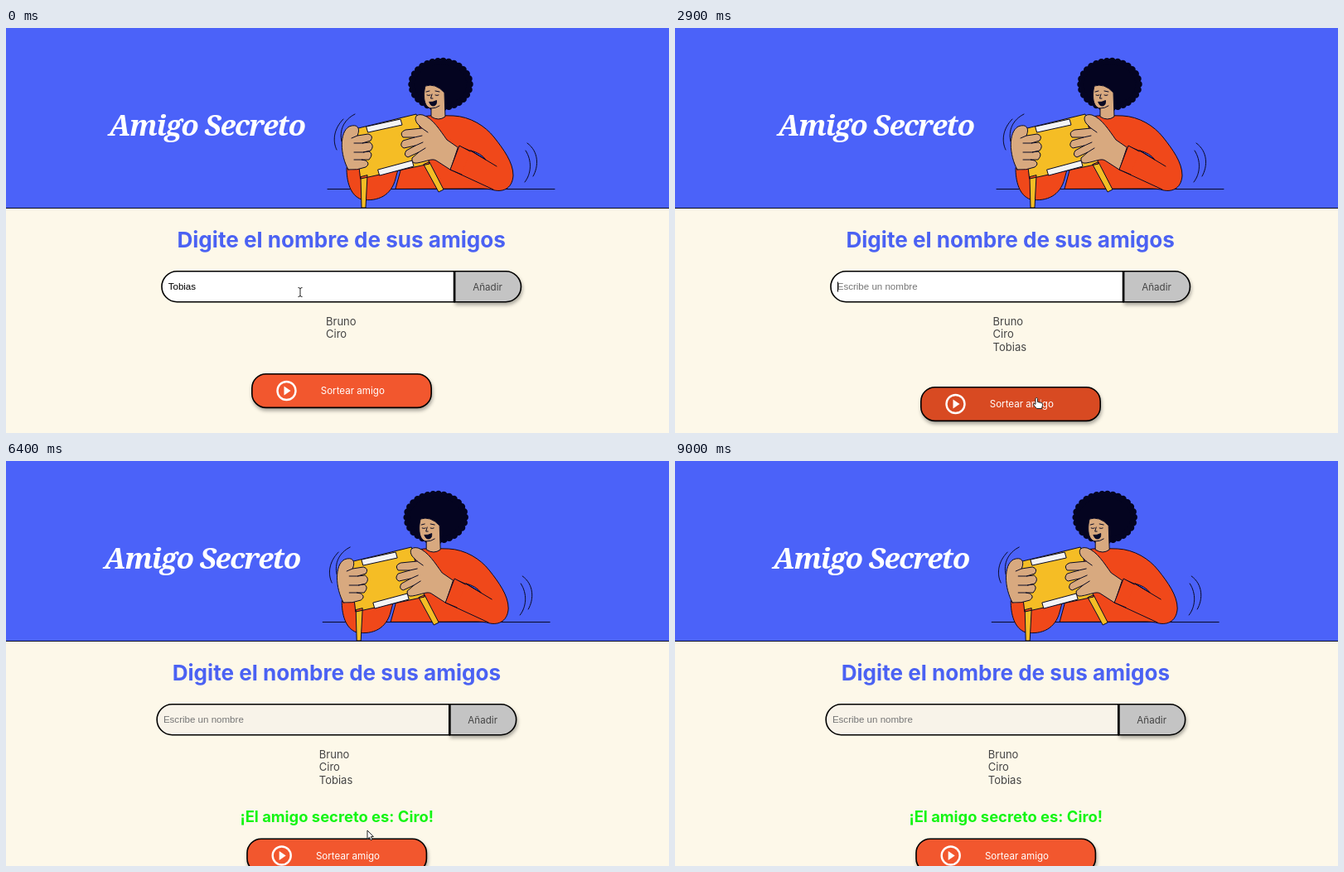
An HTML page that plays this animation: 800x489 px, repeating every 9.1 s.

```html
<!DOCTYPE html>
<html lang="es">
<head>
<meta charset="utf-8">
<title>Amigo Secreto</title>
<style>
  html, body { margin: 0; width: 100%; height: 100%; overflow: hidden; background: #fdf8e9; }
  svg { display: block; }
  text { font-family: Inter, sans-serif; fill: #444; }
  .title { font: italic 700 35px "Noto Serif", serif; letter-spacing: -1.4px; fill: #fff; }
  .heading { font-size: 26.1px; font-weight: 700; fill: #4b62f3; }
  .field { font: 11.55px "Liberation Sans", Arial, sans-serif; }
  .list { font-size: 13px; }
  .result { font-size: 18.4px; font-weight: 700; fill: #14f514; }
  .label { font-size: 11.6px; }
  .mid { text-anchor: middle; }
  .ink { stroke: #090a24; stroke-width: 1; stroke-linejoin: round; stroke-linecap: round; }
  .line { fill: none; }
  .skin { fill: #d8a97f; }
  .cloth { fill: #f0481a; }
  .wood { fill: #f5bd25; }
  .border { stroke: #000; stroke-width: 1.6; }
  .shadow { filter: drop-shadow(1px 3px 2px #0005); }
  .cursor { fill: #fff; stroke: #222; stroke-width: 1; stroke-linejoin: round; }
</style>
</head>
<body>
<svg width="800" height="489" viewBox="0 0 800 489">
  <rect width="800" height="217" fill="#4b62f9"/>
  <path d="M0 217.5H800" stroke="#090c20"/>
  <g id="page">
    <text class="title" x="124" y="130">Amigo Secreto</text>

    <g class="ink">
      <path class="line" d="M388 194.5H662"/>
      <path class="line" d="M407 110C395 122 394 137 399 147M421 104C407 111 402 124 405 137M629 139C643 149 643 167 636 179M627 148C635 160 634 176 626 186"/>
      <path class="cloth" d="M470 194L476 172L492 108Q515 104 540 106C560 107 578 118 589 132C600 146 612 162 612 178C611 195 598 199 586 195Q580 194 575 194Z"/>
      <path class="cloth" d="M411 169C411 185 415 202 429 207C449 210 465 202 470 182L473 171Z"/>
      <path fill="#4b62f9" d="M561 148L579 159Q573 151 561 148Z"/>
      <path class="line" d="M548 143L562 149L592 167M536 171L588 195"/>
    </g>

    <g fill="#040420">
      <ellipse cx="524.5" cy="68" rx="36" ry="29"/>
      <ellipse cx="524.5" cy="68" rx="35" ry="28" fill="none" stroke="#040420" stroke-width="8.5" stroke-linecap="round" stroke-dasharray="0 6.6"/>
    </g>
    <path class="skin ink" d="M506 70Q518 66 529 78L530 107Q522 113 513 107L513 97C504 96 503 81 506 70Z"/>
    <g class="ink line" stroke-width=".8">
      <path d="M513 97Q519 97 523 94M507 77l4-1M518 76l5 1M508 81q2 1 4 0M518 81q2 1 4 0M514 80l-1.5 5h2.5"/>
      <path fill="#090a24" d="M511 89.5Q515 90 519.5 87.5Q520 94 515.5 94Q512 94 511 89.5Z"/>
    </g>

    <g class="ink">
      <path class="wood" d="M428 180L429 217H434L436 178ZM504 165L522 198L528 195L511 162ZM421 122L495 104L511 164L428 182Z"/>
      <path fill="#f4f4f4" d="M435 119L476 110L478 117L437 126ZM449 171L490 160L492 167L451 178Z"/>
      <path class="skin" d="M413 171C403 153 402 126 414 119C424 115 428 121 424 130L437 128Q444 130 440 136L430 139L439 138Q445 142 440 148L431 150L438 149Q444 152 438 159L429 159L434 160Q440 164 434 168Q424 172 413 171Z"/>
      <path class="line" d="M424 130L417 133M430 139H420M431 150H420M429 159H420"/>
      <path class="skin" d="M545 144L532 135C524 124 515 109 503 105C494 103 492 109 496 115L502 121L482 123Q474 126 479 132L493 132L479 136Q474 142 480 145L494 142L483 148Q479 154 485 156L498 150L490 157Q489 164 496 163C508 161 514 157 519 160L536 171Z"/>
      <path class="line" d="M502 121L509 126M493 132L502 130M494 142L503 138M498 150L506 145"/>
      <path class="cloth" d="M547 142L560 149L550 176L536 171Z" stroke="none"/>
      <path class="line" d="M560 149L547 142L536 171L550 177"/>
    </g>

    <text class="heading mid" x="404.7" y="265">Digite el nombre de sus amigos</text>

    <path id="input" class="border" d="M541 293.8H206.4a18.45 18.45 0 0 0 0 36.9H541Z"/>
    <text id="typed" class="field" x="195.7" y="316.3"></text>
    <path id="caret" d="M0 306.5v12" stroke="#000"/>
    <g class="shadow"><path id="add" class="border" d="M541.5 293.8H603a18.45 18.45 0 0 1 0 36.9H541.5Z"/></g>
    <path d="M541 293.2V331.3" stroke="#000" stroke-width="2.4"/>
    <text class="label mid" x="581" y="316.5">Añadir</text>

    <g id="list" class="list">
      <text y="358.7">Bruno</text>
      <text y="374.3">Ciro</text>
      <text id="third" y="389.9">Tobias</text>
    </g>
    <text id="result" class="result mid" x="405" y="436">¡El amigo secreto es: Ciro!</text>

    <g id="draw">
      <rect id="drawBox" class="border shadow" x="296.8" y=".8" width="216.4" height="40.6" rx="17"/>
      <circle cx="338.5" cy="21" r="11" fill="none" stroke="#fff" stroke-width="2.4"/>
      <path d="M335.5 15.5V26.5L343.5 21Z" fill="#fff"/>
      <text class="label mid" x="418.3" y="25" style="fill:#fff">Sortear amigo</text>
    </g>
  </g>

  <g id="cursor" class="cursor">
    <path id="beam" class="line" d="M-2.5 -5.5Q0 -5.5 0 -4Q0 -5.5 2.5 -5.5M0 -4V4M-2.5 5.5Q0 5.5 0 4Q0 5.5 2.5 5.5"/>
    <path id="hand" d="M-1 2C-1 0 1.5 0 1.5 2V5.5L6 6.5Q8 7 7.5 9.5L6.5 13.5H.5L-3.5 9Q-4 6.5 -1 8.3Z"/>
    <path id="arrow" d="M0 0V10.5L2.5 8.3L4.2 11.8L6 11L4.4 7.6H7.4Z"/>
  </g>
</svg>

<script>
const $ = id => document.getElementById(id);
const LOOP = 9100, ADDED = 1700, DRAWN = 3500, LEFT = 8000;

// time, x, y of the pointer tip
const path = [
  [0, 355, 319], [200, 355, 319], [1000, 577, 320], [1900, 577, 320],
  [2600, 436, 446], [7100, 436, 446], [7300, 436, 441], [LEFT, 434, 17]
];

function pointer(t) {
  const i = path.findIndex(p => p[0] > t);
  if (i < 0) return path.at(-1).slice(1);
  const [a, b] = [path[i - 1], path[i]];
  const u = (t - a[0]) / (b[0] - a[0]), e = u * u * (3 - 2 * u);
  return [a[1] + (b[1] - a[1]) * e, a[2] + (b[2] - a[2]) * e];
}

const show = (id, on) => $(id).style.display = on ? '' : 'none';
const move = (id, x, y) => $(id).setAttribute('transform', `translate(${x} ${y})`);
const fill = (id, color) => $(id).setAttribute('fill', color);

function render(now) {
  const t = Math.floor(now % LOOP / 100) * 100;
  const added = t >= ADDED, drawn = t >= DRAWN;
  const shift = drawn ? -5.8 : 0;
  const top = drawn ? 455.5 : added ? 433 : 417;
  const [x, y] = pointer(t);
  const inside = (l, r, a, b) => x >= l + shift && x <= r + shift && y >= a && y <= b;
  const overInput = inside(188, 541, 294, 331);
  const overAdd = inside(541, 622, 294, 331);
  const overDraw = inside(296, 514, top, top + 42);

  move('page', shift, 0);
  fill('input', drawn ? '#f8f3e9' : '#fff');
  $('typed').textContent = added ? 'Escribe un nombre' : 'Tobias';
  $('typed').style.fill = added ? '#757575' : '#000';
  show('caret', !drawn && t % 1000 >= 500);
  move('caret', added ? 196.5 : 232.5, 0);
  fill('add', overAdd ? '#a0a0a0' : '#c4c4c4');
  move('list', added ? 383.6 : 386, 0);
  show('third', added);
  show('result', drawn);
  move('draw', 0, top);
  fill('drawBox', overDraw ? '#d84a22' : '#f2572e');

  show('cursor', t < LEFT);
  move('cursor', x, y);
  show('beam', overInput);
  show('hand', overAdd || overDraw);
  show('arrow', !overInput && !overAdd && !overDraw);
}

let start;
function tick(now) {
  start ??= now;
  render(now - start);
  requestAnimationFrame(tick);
}
render(0);
requestAnimationFrame(tick);
</script>
</body>
</html>
```
